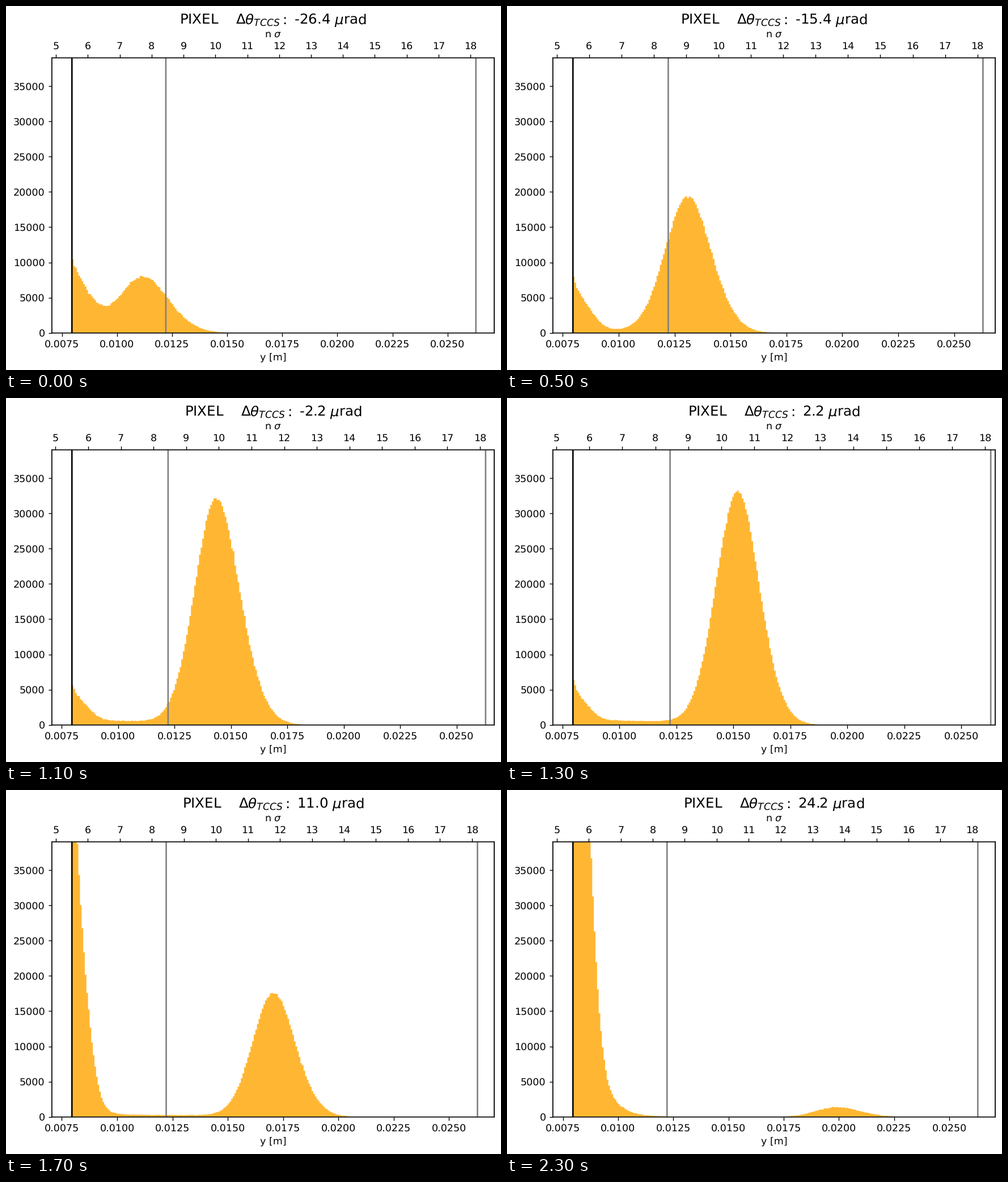
Recreate the animation shown at these times as a matplotlib script. Size 873x641 px, loop 2400 ms.

```python
import matplotlib.pyplot as plt
import numpy as np
from matplotlib.animation import FuncAnimation

W, H, DPI = 873, 641, 125.8
FRAMES, INTERVAL = 24, 100
BINS = 250
EDGE, SIGMA = 7.956, 7.956 / 5.5          # mm
GUARDS = (12.217, 26.286)                 # mm
LEFT, RIGHT, TOP, BOTTOM = 80.8, 861.1, 91.4, 575.7   # axes, px

# Key points of the scan, in mm from the edge
STEPS = (0, 5, 9, 13, 15, 23)
CENTRE = (3.26, 5.16, 5.60, 7.25, 8.18, 11.97)
TAIL = (1.60, 1.46, 1.55, 1.32, 1.36, 1.46)
REACH = (18.25, 17.98, 18.00, 17.645, 18.17, 18.21)

plt.rcParams.update({
    "font.family": "DejaVu Sans",
    "path.snap": False,
    "text.hinting": "none",
})


def angle_at(k):
    return 2.2 * (k - 12)


def peak_height(a):
    z = a - 2
    if z < 0:
        return 33200 * np.exp(-0.5 * (z / 16.8) ** 2)
    return 33200 / (1 + (z / 9.3) ** 3.6)


def density(k, d):
    """Expected counts at distance d from the edge."""
    a = angle_at(k)
    height, centre = peak_height(a), np.interp(k, STEPS, CENTRE)
    z = d - centre
    rise = (np.abs(z) / (1.31 + 0.29 * np.exp(-k / 6))) ** 2
    fall = (np.abs(z) / np.interp(k, STEPS, TAIL)) ** 1.87
    peak = height * np.exp(-np.where(z < 0, rise, fall))

    # The halo at the edge is wide for negative angles and surges past 9 urad
    early = (max(-a, 0) / 26.4) ** 1.2
    surge = 1 / (1 + np.exp((8.8 - a) / 1.65))
    spike = 2100 + 3200 * early + 53000 * surge
    shoulder = 2600 + 2500 * early + 1900 * a * surge ** 1.5
    decay = 0.2 + 0.0027 * abs(a + 4) ** 1.5
    halo = (spike * np.exp(-d / decay)
            + shoulder * np.exp(-(d / (0.93 + 0.32 * early)) ** 2.5))

    floor = 0.026 * height * (0.55 + 0.65 * np.exp(-d / 1.5))
    return peak + halo + floor * np.clip(centre - d, 0, 1)


def histogram(k):
    reach = np.interp(k, STEPS, REACH)
    d = np.linspace(0, reach, BINS + 1)
    counts = np.random.default_rng(k).poisson(density(k, (d[1:] + d[:-1]) / 2))
    return counts, (EDGE + d) / 1000, reach


fig = plt.figure(figsize=((W + 1e-6) / DPI, (H + 1e-6) / DPI), dpi=DPI, facecolor="white")
ax = fig.add_axes([LEFT / W, 1 - BOTTOM / H, (RIGHT - LEFT) / W, (BOTTOM - TOP) / H])
top_ax = ax.twiny()

counts, edges, _ = histogram(0)
bars = ax.stairs(counts, edges, fill=True, color="orange", alpha=0.8, lw=0)
ax.axvline(EDGE / 1000, color="black", lw=1.5)
for x in GUARDS:
    ax.axvline(x / 1000, color="gray", lw=1.5)

ax.set_ylim(0, 39000)
ax.set_yticks(range(0, 40000, 5000))
ax.set_xticks(np.arange(3, 11) * 0.0025)
ax.xaxis.set_major_formatter("{x:.4f}")
ax.set_xlabel("y [m]")
top_ax.set_xticks(range(5, 19))


def heading(y, text, size):
    return fig.text((LEFT + RIGHT) / 2 / W, 1 - y / H, text, fontsize=size,
                    ha="center", va="baseline")


heading(55.2, r"n $\sigma$", 10)
title = heading(32.1, "", 14)


def update(k):
    counts, edges, reach = histogram(k)
    bars.set_data(counts, edges)
    lo, hi = EDGE - 0.05 * reach, EDGE + 1.05 * reach
    ax.set_xlim(lo / 1000, hi / 1000)
    top_ax.set_xlim(lo / SIGMA, hi / SIGMA)
    title.set_text(rf"PIXEL    $\Delta\theta_{{TCCS}}:$ {angle_at(k):.1f} $\mu$rad")
    return bars, title


anim = FuncAnimation(fig, update, frames=FRAMES, interval=INTERVAL,
                     repeat=True, repeat_delay=0, blit=False)
plt.show()
```
